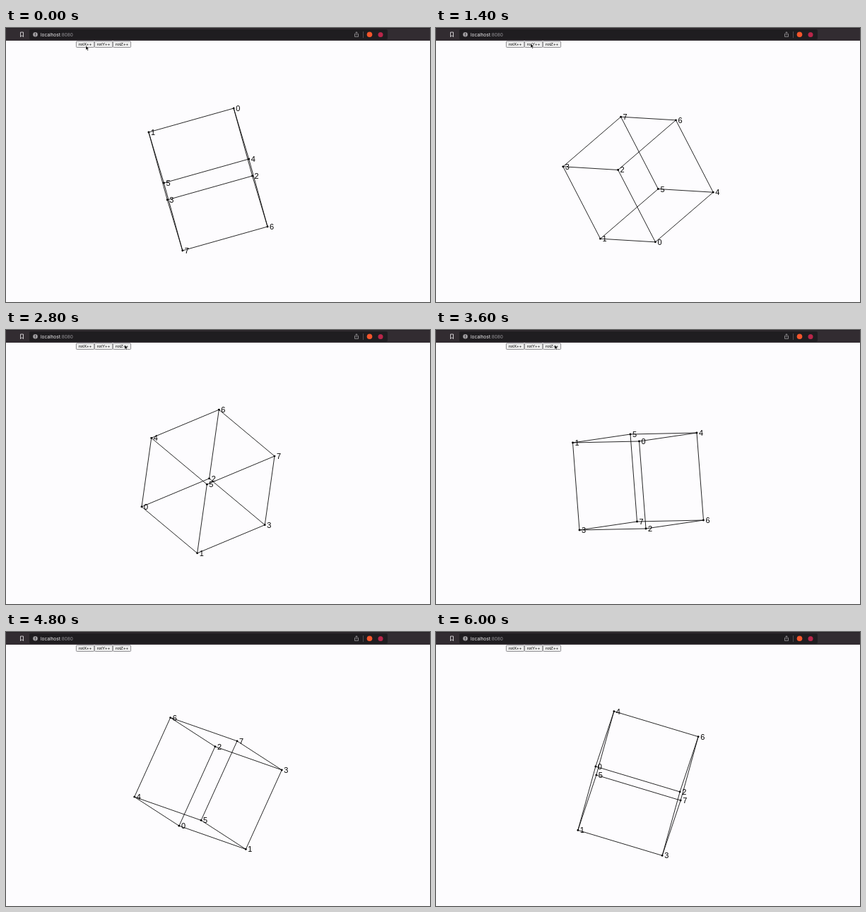
An HTML page that plays this animation: 600x389 px, repeating every 6.1 s.

```html
<!DOCTYPE html>
<html lang="en">
<head>
<meta charset="utf-8">
<title>Cube rotation</title>
<style>
  html, body { margin: 0; width: 100%; height: 100%; overflow: hidden; background: #fdfcfe; }
  svg { display: block; width: 600px; height: 389px; }
  .url { font: 6.5px Inter, sans-serif; }
  .btn rect { fill: #efefef; stroke: #77757a; stroke-width: .8; }
  .btn text { font: 6.2px "Liberation Sans", Arial, sans-serif; text-anchor: middle; fill: #000; }
  #labels text { font: 11px "Liberation Sans", Arial, sans-serif; }
  #edges { fill: none; stroke: #000; stroke-width: .85; }
</style>
</head>
<body>
<svg viewBox="0 0 600 389">
  <rect width="600" height="389" fill="#fdfcfe"/>

  <path id="edges"/>
  <g id="dots"></g>
  <g id="labels"></g>

  <rect width="600" height="18" fill="#322c31"/>
  <rect width="600" height="1" fill="#252125"/>
  <rect x="33" y="2" width="507" height="14.5" rx="2" fill="#1f1d20"/>
  <path d="M20.5 6h4v6.5l-2-1.8-2 1.8z" fill="none" stroke="#dcdadc" stroke-width=".9"/>
  <circle cx="41.5" cy="9.3" r="3.3" fill="#a09ea1"/>
  <path d="M41.5 7.3v2.4M41.5 10.4v.9" stroke="#1f1d20" stroke-width=".9"/>
  <text class="url" x="49" y="11.7" fill="#f4f2f4">localhost<tspan fill="#98969a">:8080</tspan></text>
  <path d="M494.7 8.3h-1.2v4h5v-4h-1.2M496 10.3v-4.6M494.6 7l1.4-1.4 1.4 1.4" fill="none" stroke="#b5b3b6" stroke-width=".7"/>
  <path d="M505.5 5v9" stroke="#5a575b" stroke-width=".8"/>
  <circle cx="514.5" cy="9.3" r="3.8" fill="#f4562c"/>
  <circle cx="530" cy="9.5" r="3.5" fill="#b8264a"/>

  <g class="btn">
    <rect x="99.4" y="18.9" width="25.4" height="8.6" rx="1"/><text x="112" y="25.3">rotX++</text>
    <rect x="125.4" y="18.9" width="25.4" height="8.6" rx="1"/><text x="138" y="25.3">rotY++</text>
    <rect x="151.4" y="18.9" width="25.2" height="8.6" rx="1"/><text x="164" y="25.3">rotZ++</text>
  </g>
  <path id="cursor" d="M0 0v6.2l1.4-1.2 1 2.3 1.1-.5-1-2.2h1.9z" fill="#000" stroke="#fff" stroke-width=".5"/>
</svg>

<script>
const LOOP = 6100, STEP = 100, SIDE = 124.8, CX = 286, CY = 215;
const FRICTION = .907, SUB = 10;

// Step, then the screen vectors of the three cube edges leaving corner 0.
const keys = [
  [0, -120.3, 34, 26.4, 96, 21.5, 72],
  [9, -122, -25.8, 12.5, -30.7, 23.5, -117.8],
  [19, 69, 54.5, -28.3, -92, 100.3, -63.5],
  [36, -94, 2, 9.5, 124, 81.5, -12],
  [43, 67.2, -82, -92.8, -82.4, -48.3, 44.6],
  [53, 38.5, 86.7, 117, -42.3, -21, -78.3],
  [60, -25, 90.5, 119.3, 36, 26, -78.3]
];

// Clicking spells: axis, start, end (s), acceleration (deg/s²).
const clicks = [[1, .85, 1.5, 362], [2, 2.6, 3.6, 297], [2, 3.6, 4.2, 190]];

// Pointer: time (ms), x, y.
const pointer = [
  [0, 113, 25], [300, 113, 25], [650, 134, 22], [1500, 134, 22],
  [1900, 167, 16], [2200, 168, 21], [4400, 168, 21], [4800, 175, -10]
];

const dot = (a, b) => a[0] * b[0] + a[1] * b[1] + a[2] * b[2];
const cross = (a, b) => [
  a[1] * b[2] - a[2] * b[1], a[2] * b[0] - a[0] * b[2], a[0] * b[1] - a[1] * b[0]
];
const scale = (a, s) => a.map(x => x * s);

// Turn every vector of a pose by the rotation vector w (radians).
function turn(pose, w) {
  const angle = Math.hypot(...w);
  if (angle < 1e-9) return pose;
  const k = scale(w, 1 / angle), c = Math.cos(angle), s = Math.sin(angle);
  return pose.map(v => {
    const kv = cross(k, v), d = dot(k, v) * (1 - c);
    return v.map((x, i) => x * c + kv[i] * s + k[i] * d);
  });
}

// Rotation vector that takes pose p to pose q.
function between(p, q) {
  let axis = [0, 0, 0], trace = 0;
  p.forEach((v, i) => {
    const n = cross(v, q[i]);
    axis = axis.map((x, j) => x + n[j] / SIDE ** 2);
    trace += dot(v, q[i]) / SIDE ** 2;
  });
  const len = Math.hypot(...axis);
  return len < 1e-9 ? axis : scale(axis, Math.atan2(len, trace - 1) / len);
}

function toPose([, ax, ay, bx, by, cx, cy]) {
  const z = scale(cross([ax, bx, cx], [ay, by, cy]), 1 / SIDE);
  return [[ax, ay, z[0]], [bx, by, z[1]], [cx, cy, z[2]]];
}

// Spin with friction, eased onto each key pose.
function simulate() {
  const poses = [], dt = STEP / 1000 / SUB;
  let spin = [-231, 8, 13];
  for (let k = 0; k < keys.length - 1; k++) {
    const from = keys[k][0], to = keys[k + 1][0], run = [toPose(keys[k])];
    for (let n = from; n < to; n++) {
      let pose = run[n - from];
      for (let i = 0; i < SUB; i++) {
        const t = n * STEP / 1000 + i * dt;
        spin = scale(spin, 1 - FRICTION * dt);
        for (const [axis, start, end, push] of clicks)
          if (t >= start && t < end) spin[axis] += push * dt;
        pose = turn(pose, scale(spin, dt * Math.PI / 180));
      }
      run.push(pose);
    }
    const end = toPose(keys[k + 1]), slip = between(run.pop(), end);
    run.forEach((p, i) => poses.push(turn(p, scale(slip, i / (to - from)))));
    if (k === keys.length - 2) poses.push(end);
  }
  return poses;
}

const $ = id => document.getElementById(id);
function add(parent, tag, attrs) {
  const el = document.createElementNS("http://www.w3.org/2000/svg", tag);
  for (const a in attrs) el.setAttribute(a, attrs[a]);
  return $(parent).appendChild(el);
}

const corners = [...Array(8).keys()];
const dots = corners.map(() => add("dots", "circle", { r: 1.4 }));
const labels = corners.map(i => {
  const el = add("labels", "text", { x: 3, y: 4 });
  el.textContent = i;
  return el;
});
const edges = corners.flatMap(i => [1, 2, 4].filter(b => !(i & b)).map(b => [i, i | b]));
const poses = simulate();

function movePointer(t) {
  let i = 0;
  while (i < pointer.length - 2 && pointer[i + 1][0] <= t) i++;
  const [t0, x0, y0] = pointer[i], [t1, x1, y1] = pointer[i + 1];
  const u = Math.min(1, (t - t0) / (t1 - t0)), s = u * u * (3 - 2 * u);
  $("cursor").setAttribute("transform", `translate(${x0 + (x1 - x0) * s} ${y0 + (y1 - y0) * s})`);
}

function draw(n) {
  const pose = poses[n];
  const pts = corners.map(i => [CX, CY].map((c, axis) =>
    pose.reduce((sum, v, bit) => sum + v[axis] * ((i >> bit & 1) - .5), c).toFixed(2)));
  $("edges").setAttribute("d", edges.map(([a, b]) => `M${pts[a]}L${pts[b]}`).join(""));
  pts.forEach((p, i) => {
    const move = `translate(${p})`;
    dots[i].setAttribute("transform", move);
    labels[i].setAttribute("transform", move);
  });
  movePointer(n * STEP);
}

const begin = performance.now();
function tick() {
  const t = Math.max(0, performance.now() - begin) % LOOP;
  draw(Math.floor(t / STEP));
  requestAnimationFrame(tick);
}
tick();
</script>
</body>
</html>
```
